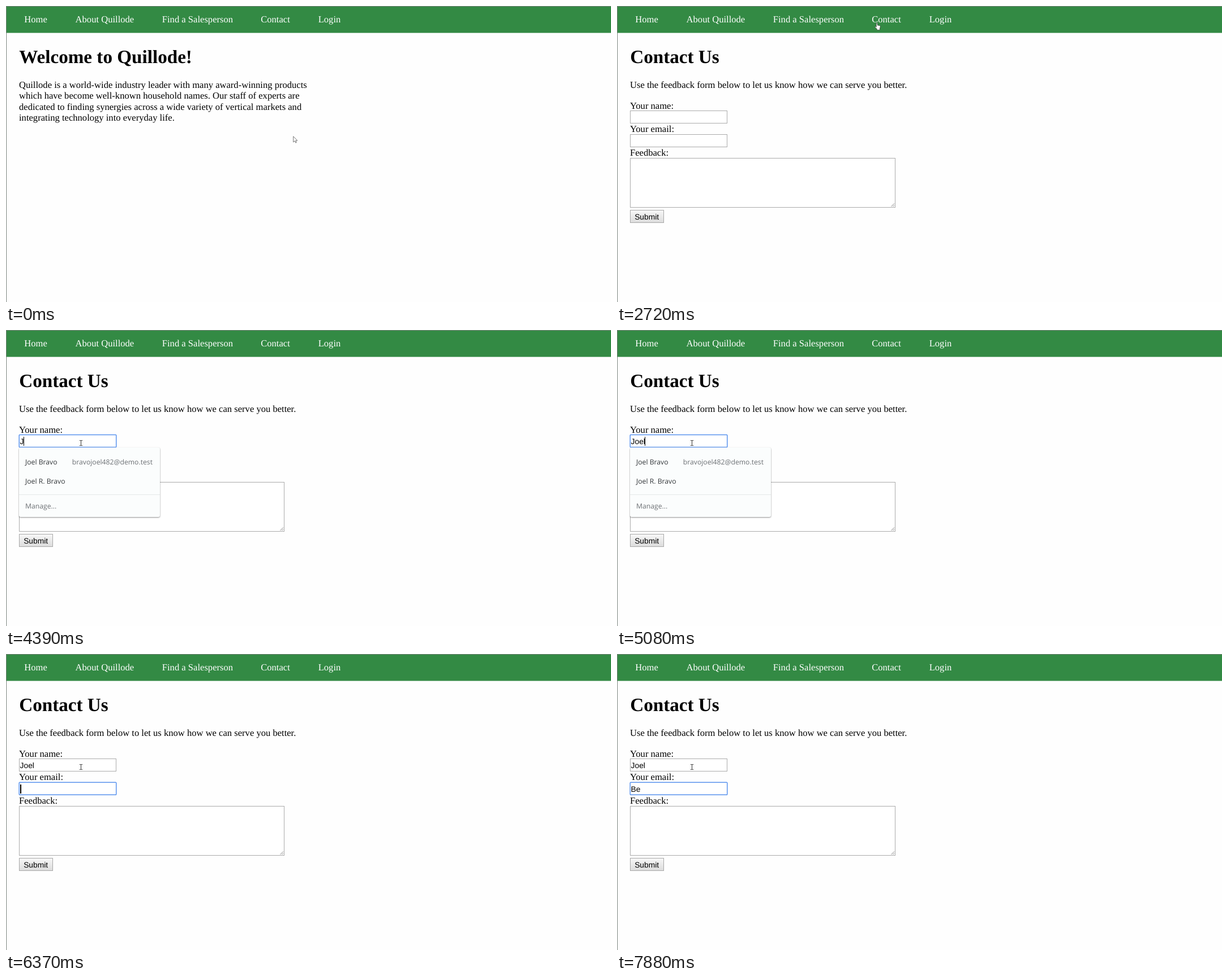
Write an HTML page that moves like this. It is 1069 px wide and 524 px high and loops after 8 s.

```html
<!DOCTYPE html>
<html lang="en">
<head>
<meta charset="utf-8">
<title>Feedback form</title>
<style>
  html, body { margin: 0; width: 100%; height: 100%; overflow: hidden; background: #fefefe; }
  svg { display: block; text-rendering: geometricPrecision; }
  text { font: 16.58px "Liberation Serif", "Times New Roman", serif; white-space: pre; }
  .nav text { fill: #fff; }
  .title { font-size: 33.16px; font-weight: bold; }
  .field { fill: #fff; stroke: #ababab; }
  .ui { font: 13.77px "Liberation Sans", Arial, sans-serif; }
  .menu text { font: 12.2px "Open Sans", "Noto Sans", sans-serif; fill: #33373a; }
  .menu .dim { fill: #6c7074; }
  .menu rect { fill: #fbfdfd; filter: drop-shadow(0 1px 1.2px rgba(0, 0, 0, .45)); }
</style>
</head>
<body>
<svg width="1069" height="524" viewBox="0 0 1069 524">
  <defs>
    <linearGradient id="shade" x2="0" y2="1">
      <stop offset="0" stop-color="#f8f8f8"/>
      <stop offset="1" stop-color="#dcdcdc"/>
    </linearGradient>
  </defs>
  <rect width="1069" height="47.6" fill="#338a44"/>
  <path d="M0 .5H1069M.5 0V524" stroke="#7d857f"/>
  <g class="nav">
    <text x="32.3" y="29">Home</text>
    <text x="122.6" y="29">About Quillode</text>
    <text x="275.8" y="29">Find a Salesperson</text>
    <text x="450.2" y="29">Contact</text>
    <text x="551.7" y="29">Login</text>
  </g>

  <g id="home">
    <text class="title" x="23.2" y="100.5">Welcome to Quillode!</text>
    <text x="23" y="145">Quillode is a world-wide industry leader with many award-winning products</text>
    <text x="23" y="164.4">which have become well-known household names. Our staff of experts are</text>
    <text x="23" y="183.8">dedicated to finding synergies across a wide variety of vertical markets and</text>
    <text x="23" y="203.2">integrating technology into everyday life.</text>
  </g>

  <g id="contact">
    <text class="title" x="23.2" y="100.5">Contact Us</text>
    <text x="23" y="145">Use the feedback form below to let us know how we can serve you better.</text>
    <text x="23" y="181.5">Your name:</text>
    <text x="23" y="223">Your email:</text>
    <text x="23" y="265">Feedback:</text>
    <rect class="field" x="23.5" y="185.5" width="171" height="22"/>
    <rect class="field" x="23.5" y="227.5" width="171" height="22"/>
    <rect class="field" x="23.5" y="269.5" width="468" height="87"/>
    <path d="M484.5 355L490 349.5M487.5 355L490 352.5" stroke="#888"/>
    <rect x="23.5" y="361.5" width="59" height="22" fill="url(#shade)" stroke="#a8a8a8"/>
    <text class="ui" x="31.2" y="377.5">Submit</text>
    <rect id="ring" x="23.25" width="171.5" height="22" rx="1" fill="none" stroke="#5a93ee" stroke-width="1.5"/>
    <text class="ui" id="name" x="24.6" y="202"/>
    <text class="ui" id="mail" x="24.6" y="243.5"/>
    <rect id="caret" height="16"/>
  </g>

  <g id="menus"></g>

  <g id="cursor">
    <path id="arrow" d="M.7 .8V11L3.1 8.8L4.8 12.2L6.3 11.5L4.8 8.2H7.8Z" fill="#fff" stroke="#555" stroke-width=".8"/>
    <path id="hand" d="M3.2 8.4V1.6Q4.2 .2 5.2 1.6V5L9.4 5.8Q10.4 6.4 10.2 8L9.4 11V13.4H4.2V11.6L1 8.4Q.6 6.6 2 7Z" fill="#fff" stroke="#222" stroke-width=".6"/>
    <path id="beam" d="M0 .5H2L2.5 1L3 .5H5M2.5 1V9M0 9.5H2L2.5 9L3 9.5H5" fill="none" stroke="#333"/>
  </g>
</svg>
<script>
const $ = id => document.getElementById(id);
const show = (id, on) => $(id).style.display = on ? '' : 'none';

// rows are [main text, side text]; managed menus end with a "Manage..." row
function menu(id, top, width, rows, managed) {
  const end = rows.length * 34 + 16;
  const label = (x, y, str, style = '') => `<text x="${x}" y="${top + y}" ${style}>${str}</text>`;
  let out = `<rect x="23" y="${top}" width="${width}" height="${end + (managed ? 39 : 0)}" rx="3"/>`;
  rows.forEach(([main, side], i) => {
    out += label(34, 30 + i * 34, main);
    if (side) out += label(259, 30 + i * 34, side, 'class="dim" text-anchor="end"');
  });
  if (managed) {
    out += `<path d="M23 ${top + end - .5}h${width}" stroke="#e4e8e8"/>`;
    out += label(34, end + 24, 'Manage...', 'class="dim"');
  }
  $('menus').innerHTML += `<g class="menu" id="${id}">${out}</g>`;
}

const person = 'Joel Bravo', address = 'bravojoel482@demo.test';
menu('recent', 208, 173, [['Joel'], [person], ['Joel R. Bravo']], false);
menu('people', 208, 249, [[person, address], ['Joel R. Bravo']], true);
menu('emails', 250, 249, [[address, person]], true);

// each step changes part of the state from its time on
const steps = [
  [0, { page: 'home', cur: 'arrow', x: 507, y: 230, name: '', mail: '', focus: '', caret: false, menu: '' }],
  [250, { x: 501, y: 160 }],
  [380, { x: 488, y: 82 }],
  [530, { x: 464, y: 49 }],
  [690, { cur: 'hand', x: 457, y: 31 }],
  [840, { x: 455, y: 29 }],
  [2720, { page: 'contact' }],
  [3120, { cur: 'arrow', x: 325, y: 105 }],
  [3240, { cur: 'beam', x: 168, y: 189 }],
  [3380, { x: 135, y: 195 }],
  [3540, { x: 130, y: 195 }],
  [3690, { focus: 'name', caret: true }],
  [3830, { menu: 'recent' }],
  [4240, { caret: false }],
  [4390, { name: 'J', caret: true, menu: 'people' }],
  [4660, { name: 'Jo' }],
  [4810, { name: 'Joe' }],
  [5080, { name: 'Joel' }],
  [5350, { focus: 'mail', menu: '' }],
  [5940, { caret: false }],
  [6370, { caret: true }],
  [6500, { mail: 'B', menu: 'emails' }],
  [6930, { caret: false }],
  [7360, { mail: 'Be', caret: true, menu: '' }],
  [7880, { caret: false }]
];

function draw(t) {
  const s = Object.assign({}, ...steps.filter(([at]) => at <= t).map(([, change]) => change));
  for (const id of ['home', 'contact']) show(id, id === s.page);
  for (const id of ['recent', 'people', 'emails']) show(id, id === s.menu);
  for (const id of ['arrow', 'hand', 'beam']) show(id, id === s.cur);
  $('cursor').setAttribute('transform', `translate(${s.x} ${s.y})`);
  $('name').textContent = s.name;
  $('mail').textContent = s.mail;
  show('ring', s.focus);
  show('caret', s.focus && s.caret);
  if (!s.focus) return;
  const top = s.focus === 'name' ? 185.5 : 227.25;
  const text = s[s.focus];
  $('ring').setAttribute('y', top);
  $('caret').setAttribute('x', text ? Math.floor(24.6 + $(s.focus).getComputedTextLength()) : 25);
  $('caret').setAttribute('y', Math.floor(top) + 4);
  $('caret').setAttribute('width', text ? 1 : 2);
}

const start = performance.now();
function tick() {
  draw((performance.now() - start) % 8000);
  requestAnimationFrame(tick);
}
tick();
</script>
</body>
</html>
```
